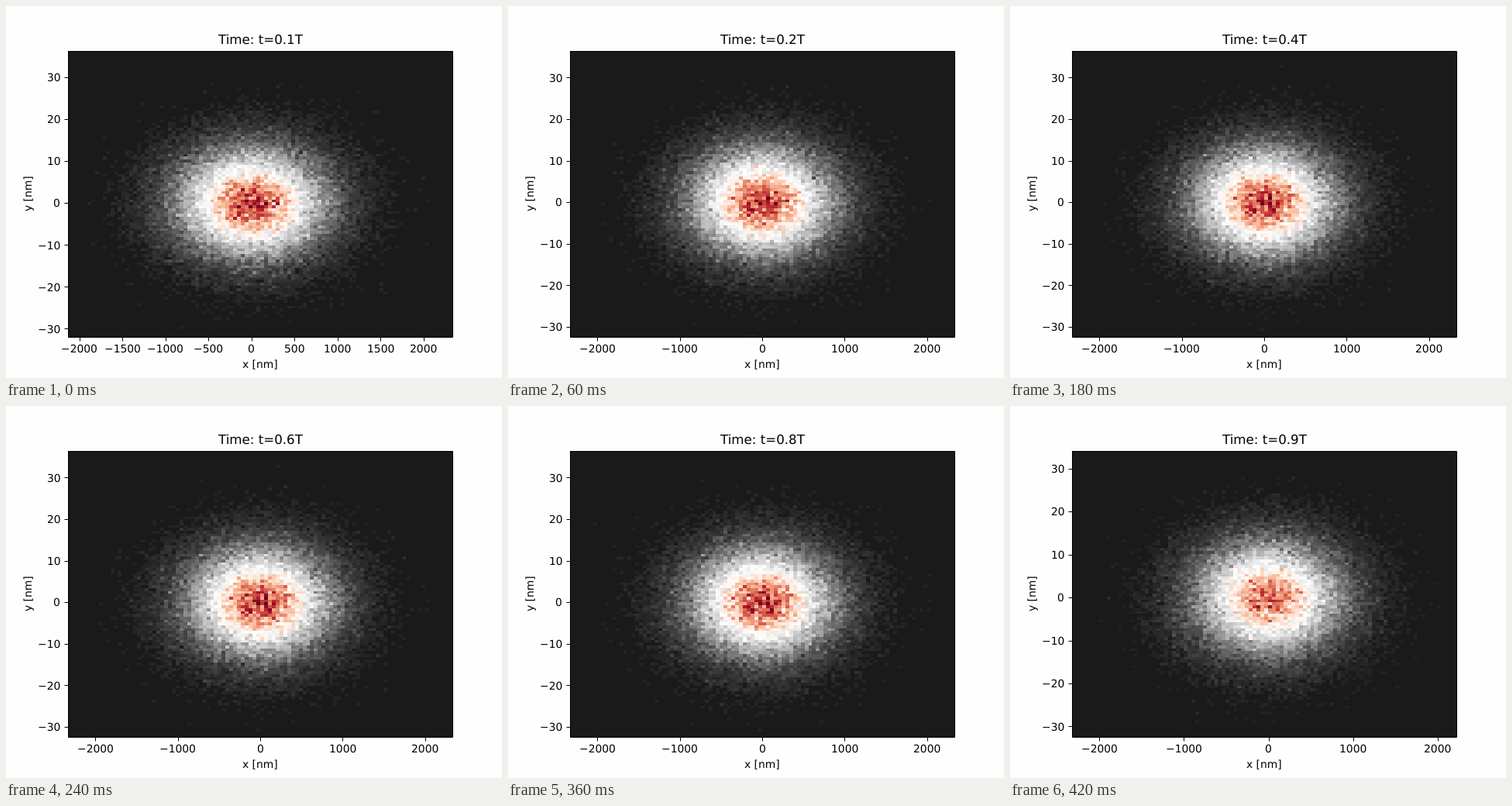
An HTML page with a canvas for the animation above (0.45 s loop, 640 by 480 pixels).

```html
<!DOCTYPE html>
<html lang="en">
<head>
<meta charset="utf-8">
<title>Particle density</title>
<style>
  html, body { margin: 0; width: 100%; height: 100%; overflow: hidden; background: #fefefe; }
  canvas, svg { position: absolute; left: 0; top: 0; width: 640px; height: 480px; display: block; }
  text { font: 13.89px "DejaVu Sans", sans-serif; fill: #000; text-rendering: geometricPrecision; }
  .title { font-size: 16.67px; }
  path { fill: none; stroke: #000; stroke-width: 1; }
</style>
</head>
<body>
<canvas id="plot" width="640" height="480"></canvas>
<svg viewBox="0 0 640 480">
  <path d="M80.5 58.5H576.5V427.5H80.5Z"/>
  <path id="ticks"/>
  <g id="labels"></g>
  <text id="title" class="title" y="49"></text>
  <text id="xlabel" y="467">x [nm]</text>
  <text transform="translate(33 265) rotate(-90)">y [nm]</text>
</svg>
<script>
const STEPS = 15, STEP_MS = 30, BINS = 100, COUNT = 80000;
const LEFT = 80, TOP = 57.6, WIDTH = 496, HEIGHT = 369.6;
const SIGMA_X = 542, SIGMA_Y = 8.1;
const $ = id => document.getElementById(id);
const ctx = $('plot').getContext('2d');

// Axis limits, tick spacing and colour ceiling
const FIRST = { x0: -2133, x1: 2333, y0: -32, y1: 36.4, tick: 500, peak: 112 };
const MIDDLE = { x0: -2331, x1: 2331, y0: -32.48, y1: 36.48, tick: 1000, peak: 118 };
const LAST = { x0: -2323, x1: 2221, y0: -32.5, y1: 34.2, tick: 1000, peak: 121 };
const viewAt = k => k === 0 ? FIRST : k === STEPS - 1 ? LAST : MIDDLE;

const STOPS = ['1a1a1a', '4d4d4d', '878787', 'bababa', 'e0e0e0', 'ffffff',
  'fddbc7', 'f4a582', 'd6604d', 'b2182b', '67001f']
  .map(h => [0, 2, 4].map(i => parseInt(h.slice(i, i + 2), 16)));

function colour(v) {
  const s = Math.min(v, 1) * 10, i = Math.min(9, Math.floor(s)), f = s - i;
  return 'rgb(' + STOPS[i].map((c, n) => Math.round(c + (STOPS[i + 1][n] - c) * f)) + ')';
}

let seed = 20417;
function random() {
  seed = (seed + 0x6d2b79f5) | 0;
  let t = Math.imul(seed ^ (seed >>> 15), 1 | seed);
  t = (t + Math.imul(t ^ (t >>> 7), 61 | t)) ^ t;
  return ((t ^ (t >>> 14)) >>> 0) / 4294967296;
}
const gauss = () => Math.sqrt(-2 * Math.log(1 - random())) * Math.cos(2 * Math.PI * random());
const list = fn => Float32Array.from({ length: COUNT }, (_, i) => fn(i));

// Varying the spread per particle gives a sharper core and longer tails
const spread = list(() => 0.75 + 0.5 * random());
const px = list(i => SIGMA_X * spread[i] * gauss());
const py = list(i => SIGMA_Y * spread[i] * gauss());
const vx = list(() => 28 * gauss());
const vy = list(() => 0.41 * gauss());

// Particles barely move around half a period and drift faster at the ends
function histogram(k) {
  const v = viewAt(k), bins = new Uint16Array(BINS * BINS);
  const drift = (2 * (k + 1) / (STEPS + 1) - 1) ** 3;
  const sx = BINS / (v.x1 - v.x0), sy = BINS / (v.y1 - v.y0);
  for (let i = 0; i < COUNT; i++) {
    const cx = Math.floor((px[i] + vx[i] * drift - v.x0) * sx);
    const cy = Math.floor((py[i] + vy[i] * drift - v.y0) * sy);
    if (cx >= 0 && cx < BINS && cy >= 0 && cy < BINS) bins[cy * BINS + cx]++;
  }
  return bins;
}
const frames = Array.from({ length: STEPS }, (_, k) => histogram(k));

const edgeX = i => Math.round(LEFT + WIDTH * i / BINS);
const edgeY = j => Math.round(TOP + HEIGHT * (1 - j / BINS));

function drawCells(k) {
  const bins = frames[k], peak = viewAt(k).peak;
  ctx.fillStyle = colour(0);
  ctx.fillRect(LEFT, 58, WIDTH, 369);
  for (let j = 0; j < BINS; j++) {
    for (let i = 0; i < BINS; i++) {
      const n = bins[j * BINS + i];
      if (n < 2) continue;
      const x = edgeX(i), y = edgeY(j + 1);
      ctx.fillStyle = colour(n / peak);
      ctx.fillRect(x, y, edgeX(i + 1) - x, edgeY(j) - y);
    }
  }
}

// Starts the text on a whole pixel; share is the part of its width left of x
function align(el, x, share) {
  el.setAttribute('x', Math.round(x - el.getComputedTextLength() * share));
}

function addLabel(n, x, y, share) {
  const el = document.createElementNS('http://www.w3.org/2000/svg', 'text');
  el.textContent = String(n).replace('-', '\u2212');
  el.setAttribute('y', Math.round(y));
  $('labels').append(el);
  align(el, x, share);
}

function drawAxes(v) {
  let d = '';
  $('labels').textContent = '';
  for (let n = -2000; n <= 2000; n += v.tick) {
    const x = LEFT + WIDTH * (n - v.x0) / (v.x1 - v.x0);
    d += `M${Math.round(x) + 0.5} 427.5v5`;
    addLabel(n, x, 447, 0.5);
  }
  for (let n = -30; n <= 30; n += 10) {
    const y = TOP + HEIGHT * (v.y1 - n) / (v.y1 - v.y0);
    d += `M80.5 ${Math.round(y) + 0.5}h-5`;
    addLabel(n, 70.3, y + 5.2, 1);
  }
  $('ticks').setAttribute('d', d);
}

// One decimal, ties to the even digit
function tenths(t) {
  const s = t * 10, f = Math.floor(s);
  const n = s - f === 0.5 ? f + f % 2 : Math.round(s);
  return (n / 10).toFixed(1);
}

let shown = -1, view = null;
function render(ms) {
  const k = Math.floor(Math.max(0, ms) / STEP_MS) % STEPS;
  if (k === shown) return;
  shown = k;
  drawCells(k);
  if (view !== viewAt(k)) drawAxes(view = viewAt(k));
  $('title').textContent = `Time: t=${tenths((k + 1) / (STEPS + 1))}T`;
  align($('title'), 328, 0.5);
}

align($('xlabel'), 328, 0.5);
const start = performance.now();
function loop() {
  render(performance.now() - start);
  requestAnimationFrame(loop);
}
loop();
</script>
</body>
</html>
```
